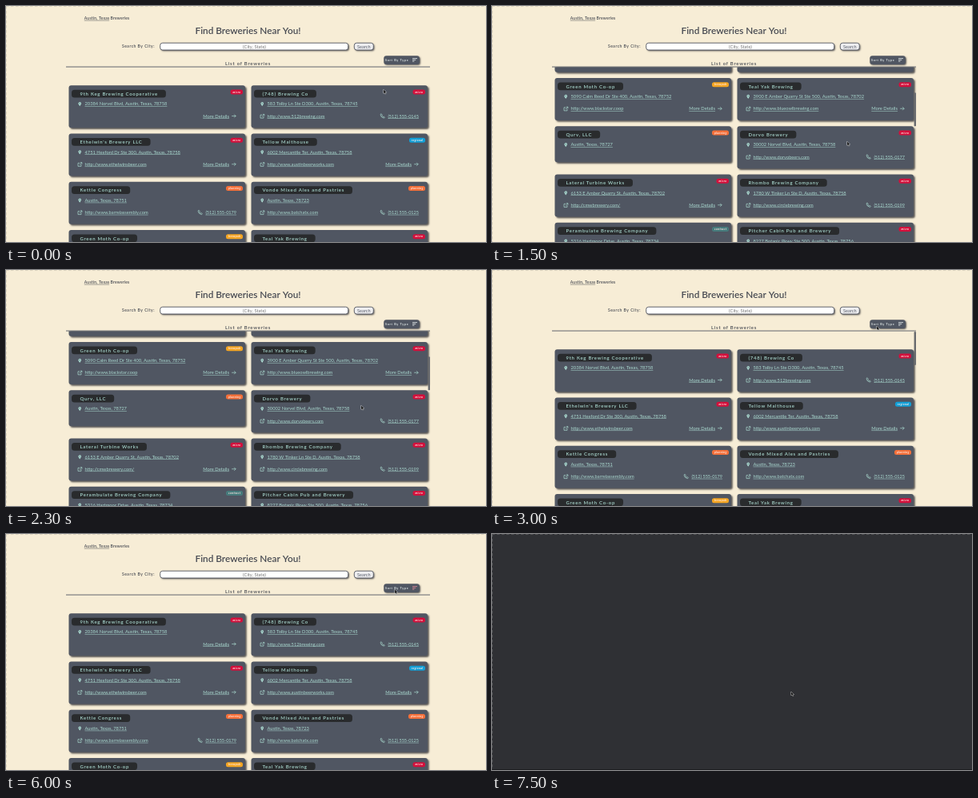
Write an HTML page with a canvas that moves like this. It is 600x295 px and loops after 8000 ms.

```html
<!DOCTYPE html>
<html lang="en">
<head>
<meta charset="utf-8">
<title>Brewery finder</title>
<style>
html, body { margin: 0; width: 100%; height: 100%; overflow: hidden; background: #f7edd6; }
canvas { display: block; width: 600px; height: 295px; }
</style>
</head>
<body>
<canvas id="stage"></canvas>
<script>
const W = 600, H = 295, LOOP = 8000;
const canvas = document.getElementById('stage');
const ratio = window.devicePixelRatio || 1;
canvas.width = W * ratio;
canvas.height = H * ratio;
const ctx = canvas.getContext('2d');

const CREAM = '#f7edd6', SLATE = '#505662', INK = '#474a52', MINT = '#a9d8cf', TAB = '#292b2d';
const BADGES = {
  micro: ['#d3103c', 15.5],
  regional: ['#12a0d8', 20],
  planning: ['#f4703a', 21],
  brewpub: ['#f5a623', 21],
  contract: ['#477b7c', 21]
};

// name, type, street, zip, site, phone
const breweries = [
  ['9th Keg Brewing Cooperative', 'micro', '20384 Norvel Blvd', 78758],
  ['(748) Brewing Co', 'micro', '583 Tolby Ln Ste D300', 78745, 'www.512brewing.com', '(512) 555-0145'],
  ["Ethelwin's Brewery LLC", 'micro', '4751 Hexford Dr Ste 300', 78758, 'www.ethelwinsbeer.com'],
  ['Tellow Malthouse', 'regional', '6002 Mercantile Ter', 78758, 'www.austinbeerworks.com'],
  ['Kettle Congress', 'planning', '', 78751, 'www.barrelassembly.com', '(512) 555-0179'],
  ['Vonde Mixed Ales and Pastries', 'planning', '', 78723, 'www.batchatx.com', '(512) 555-0125'],
  ['Green Moth Co-op', 'brewpub', '5090 Calm Reed Dr Ste 400', 78752, 'www.blackstar.coop'],
  ['Teal Yak Brewing', 'micro', '3900 E Amber Quarry St Ste 500', 78702, 'www.blueowlbrewing.com'],
  ['Qurv, LLC', 'planning', '', 78727, '', '', true],
  ['Dorvo Brewery', 'micro', '30002 Norvel Blvd', 78758, 'www.dorvobeers.com', '(512) 555-0177'],
  ['Lateral Turbine Works', 'micro', '6153 E Amber Quarry St', 78702, 'cmwbrewery.com/'],
  ['Rhombo Brewing Company', 'micro', '1780 W Tinker Ln Ste D', 78758, 'www.circlebrewing.com', '(512) 555-0199'],
  ['Perambulate Brewing Company', 'contract', '5316 Hartmoor Drive', 78734, 'www.destinationbrewing.co', '(512) 555-0158'],
  ['Pitcher Cabin Pub and Brewery', 'micro', '8227 Botanic Pkwy Ste 500', 78756, 'www.draughthouse.com'],
  ['Diving Hat Brewing Company', 'micro', '', 78744],
  ['Cousins and Nieces Brewing', 'micro', '', 78702]
];

const scrollKeys = [[800, 0], [1000, 72.5], [1300, 150], [1500, 190], [1800, 232], [2000, 239], [2300, 190], [2500, 60], [2800, 0]];
const xKeys = [[0, 472], [300, 466], [500, 450], [800, 444], [2500, 444], [2800, 477], [3000, 481], [3300, 486]];
const yKeys = [[0, 104.5], [300, 122], [500, 158], [800, 169.5], [2500, 169.5], [2800, 84], [3000, 70], [3300, 69.5]];

function track(keys, t) {
  if (t <= keys[0][0]) return keys[0][1];
  for (let i = 1; i < keys.length; i++) {
    const [t0, a] = keys[i - 1], [t1, b] = keys[i];
    if (t < t1) return a + (b - a) * (t - t0) / (t1 - t0);
  }
  return keys[keys.length - 1][1];
}

// The picture refreshes four times per second at uneven offsets.
function hold(t) {
  const part = t % 1000;
  return t - part + [800, 500, 300, 0].find(step => part >= step);
}

function text(str, x, y, size, color, { weight = 400, space = 0, align = 'left', line = false, italic = '' } = {}) {
  ctx.font = `${italic} ${weight} ${size}px Lato, "Open Sans", sans-serif`;
  ctx.letterSpacing = space + 'px';
  ctx.fillStyle = color;
  const w = ctx.measureText(str).width - space;
  const left = align === 'center' ? x - w / 2 : align === 'right' ? x - w : x;
  ctx.fillText(str, left, y);
  if (line) ctx.fillRect(left, y + 0.8, w, 0.5);
  return w;
}

function box(x, y, w, h, r, fill, stroke) {
  ctx.beginPath();
  ctx.roundRect(x, y, w, h, r);
  if (fill) {
    ctx.fillStyle = fill;
    ctx.fill();
  }
  if (stroke) {
    ctx.strokeStyle = stroke;
    ctx.lineWidth = 0.9;
    ctx.stroke();
  }
}

function raised(x, y, w, h, r, fill, stroke, depth = 1.5) {
  ctx.save();
  ctx.shadowColor = 'rgba(40, 40, 45, .75)';
  ctx.shadowBlur = 2 * ratio;
  ctx.shadowOffsetX = ctx.shadowOffsetY = depth * ratio;
  box(x, y, w, h, r, fill);
  ctx.restore();
  if (stroke) box(x, y, w, h, r, null, stroke);
}

function strokePath(d, x, y, color, width = 0.7) {
  ctx.save();
  ctx.translate(x, y);
  ctx.strokeStyle = color;
  ctx.lineWidth = width;
  ctx.stroke(new Path2D(d));
  ctx.restore();
}

function pin(x, y) {
  ctx.fillStyle = MINT;
  ctx.beginPath();
  ctx.arc(x, y - 0.7, 1.8, Math.PI * 0.9, Math.PI * 0.1);
  ctx.lineTo(x, y + 2.7);
  ctx.fill();
  ctx.fillStyle = SLATE;
  ctx.beginPath();
  ctx.arc(x, y - 0.8, 0.6, 0, 7);
  ctx.fill();
}

function card(item, x, y) {
  const [name, type, street, zip, site, phone, short] = item;
  raised(x, y, 220.5, short ? 45 : 53, 3, SLATE, null, 1.8);

  const style = { weight: 600, space: 0.72 };
  ctx.font = '600 6px Lato, "Open Sans", sans-serif';
  ctx.letterSpacing = style.space + 'px';
  box(x + 3.5, y + 5.6, ctx.measureText(name).width + 20.5, 9.6, 3.5, TAB);
  text(name, x + 14, y + 12.6, 6, MINT, style);

  const [color, width] = BADGES[type];
  const right = x + 217.5;
  box(right - width, y + 5.3, width, 6, 2.5, color);
  text(type, right - width / 2, y + 9.4, 3.4, '#ffe9e4', { weight: 700, space: 0.4, align: 'center', italic: 'italic' });

  const link = { line: true };
  pin(x + 13.7, y + 23.4);
  text((street ? street + ', ' : '') + 'Austin, Texas, ' + zip, x + 20, y + 25.2, 5.75, MINT, link);
  if (short) return;

  if (site) {
    strokePath('M0-1.6h-2.2v4h4v-2.2M.7-2.3h2v2M2.6-2.2L-.3.7', x + 13.7, y + 38.5, MINT);
    text('http://' + site, x + 20, y + 40.3, 5.7, MINT, link);
  }
  const end = x + 209.5;
  if (phone) {
    const w = text(phone, end, y + 40.3, 5.55, MINT, { line: true, align: 'right' });
    strokePath('M-2.4-1.8L-1.3-2.7L0-1L-.6-.2Q-.1.9 1 1.3L1.7.6L3 1.7L2.1 2.8Q-2 2-2.4-1.8z', end - w - 7, y + 38.2, MINT);
  } else {
    text('More Details', end - 9, y + 40.3, 5.8, MINT, { line: true, align: 'right' });
    strokePath('M0 0h5M3-2l2 2l-2 2', end - 5.8, y + 38.3, MINT);
  }
}

function cursor(x, y, fill, stroke) {
  ctx.save();
  ctx.translate(x, y);
  const arrow = new Path2D('M0 0V4.8L1.1 3.8L1.9 5.5L2.8 5.1L2 3.5H3.4z');
  ctx.strokeStyle = stroke;
  ctx.lineWidth = 0.8;
  ctx.stroke(arrow);
  ctx.fillStyle = fill;
  ctx.fill(arrow);
  ctx.restore();
}

function frameEdge(color) {
  ctx.save();
  ctx.setLineDash([3.5, 2.5]);
  strokePath('M0 .5H600M.5 0V295', 0, 0, color, 0.9);
  ctx.restore();
}

function header(t) {
  const small = { weight: 600, space: 0.2 };
  const w = text('Austin, Texas', 97.8, 17, 5, INK, { ...small, line: true });
  text('Breweries', 97.8 + w + 1.5, 17, 5, INK, small);
  text('Find Breweries Near You!', 302.5, 35, 11.8, INK, { weight: 600, align: 'center' });
  text('Search By City:', 145, 52, 5, INK, { weight: 600, space: 0.5 });

  raised(192.7, 46.2, 235, 8.8, 3, '#fff', '#555963', 1.2);
  text('(City, State)', 310.5, 52.5, 5.8, '#777', { align: 'center' });
  raised(435.3, 46.2, 24, 8.8, 3, '#eeeef0', '#555963', 1.2);
  text('Search', 447.3, 52.5, 5.6, '#555b68', { align: 'center' });

  text('List of Breweries', 302.2, 74, 6, INK, { weight: 600, space: 0.75, align: 'center' });
  ctx.fillStyle = SLATE;
  ctx.fillRect(75, 75.6, 455, 0.9);

  raised(472.3, 62.3, 44.5, 10.6, 3, SLATE, null, 1.2);
  text('Sort By Type', 474, 69, 3.7, '#dfe6e6', { weight: 700, space: 0.7 });
  strokePath('M0 0h6M0 1.8h4.2M0 3.6h2.4', 508, 65.6, t >= 3300 ? '#e08a98' : '#e6ecec', 0.8);
}

function page(t) {
  ctx.fillStyle = CREAM;
  ctx.fillRect(0, 0, W, H);
  frameEdge('#dbd3be');

  const scroll = track(scrollKeys, t);
  ctx.save();
  ctx.beginPath();
  ctx.rect(74, 76.4, 458, H);
  ctx.clip();
  breweries.forEach((item, i) => {
    const y = 99.2 + 60.25 * Math.floor(i / 2) - scroll;
    if (y > 10 && y < H) card(item, i % 2 ? 306.5 : 78.5, y);
  });
  if (t >= 800 && t < 3500) box(527.6, 77 + scroll * 0.165, 2.4, 42, 1.2, '#686a6e');
  ctx.restore();

  header(t);
  cursor(track(xKeys, t), track(yKeys, t), '#222', '#e8e8e8');
}

function blank() {
  ctx.fillStyle = '#2f3034';
  ctx.fillRect(0, 0, W, H);
  frameEdge('#55565a');
  ctx.fillStyle = '#1c1d20';
  ctx.fillRect(0, 294, W, 1);
  cursor(374, 197, '#222', '#d0d0d0');
}

const start = performance.now();
function draw() {
  const t = hold((performance.now() - start) % LOOP);
  ctx.setTransform(ratio, 0, 0, ratio, 0, 0);
  if (t < 7500) page(t);
  else blank();
  requestAnimationFrame(draw);
}
draw();
</script>
</body>
</html>
```
